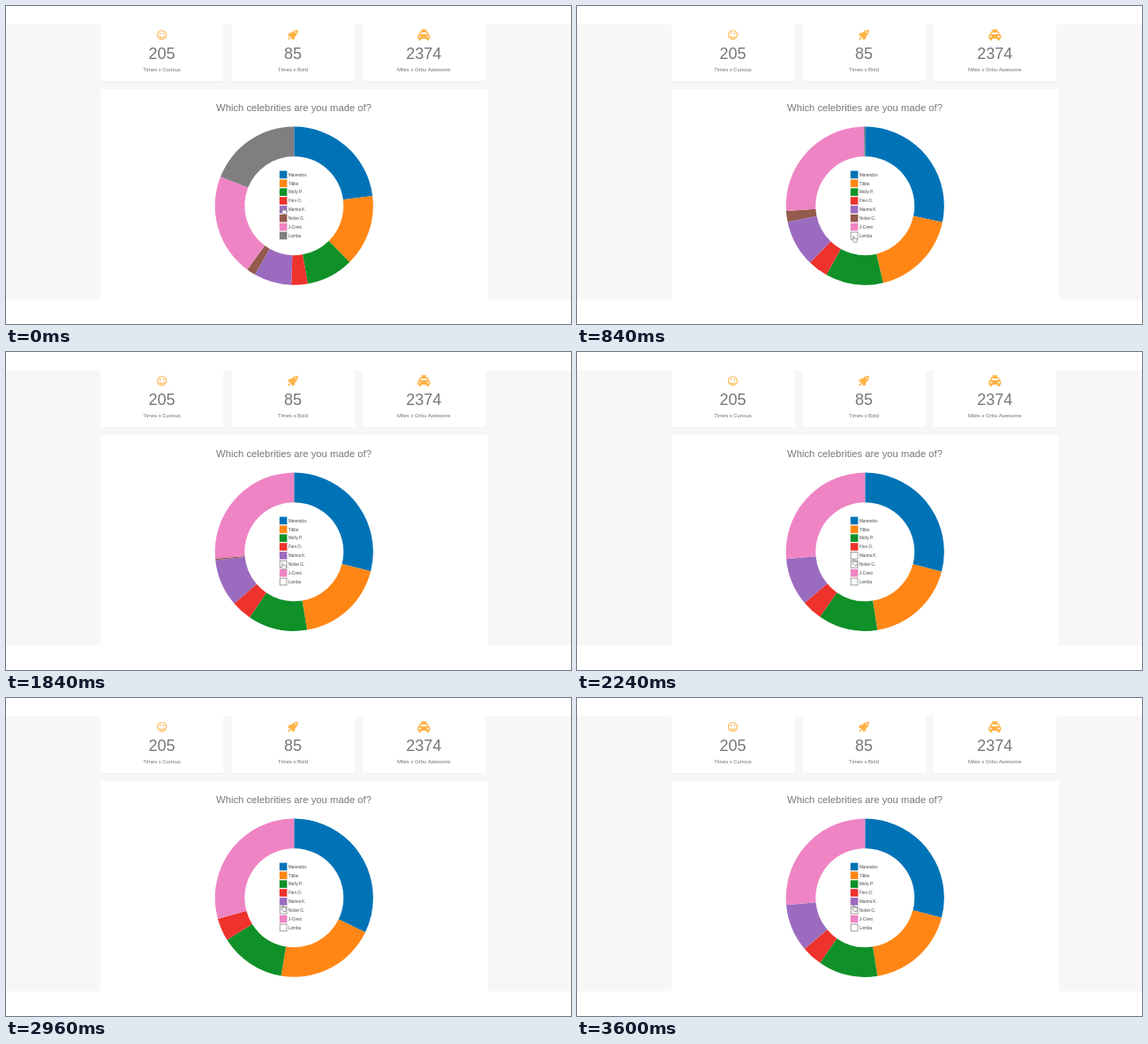
These frames come from a looping animation (640x360 px, 3640 ms). An HTML page with a canvas:

```html
<!DOCTYPE html>
<html lang="en">
<head>
<meta charset="utf-8">
<title>Celebrity donut</title>
<style>
  html, body { margin: 0; width: 100%; height: 100%; overflow: hidden; background: #fff; }
  canvas { display: block; width: 640px; height: 360px; }
</style>
</head>
<body>
<canvas id="stage" width="640" height="360"></canvas>
<script>
const ctx = document.getElementById('stage').getContext('2d');
const LOOP = 3640, STEP = 40;
const FONT = '"Liberation Sans", Arial, sans-serif';
const AMBER = '#ffb347';

const series = [
  { name: 'Marendos', color: '#0073b7', size: 82.8 },
  { name: 'Tibbo', color: '#ff8614', size: 52.6 },
  { name: 'Molly P.', color: '#0f9028', size: 34.6 },
  { name: 'Finn O.', color: '#ee322c', size: 12 },
  { name: 'Marina K.', color: '#9b6bbf', size: 27.7 },
  { name: 'Nolan G.', color: '#935a4d', size: 6.6 },
  { name: 'J-Crest', color: '#ee84c4', size: 75.3 },
  { name: 'Lomba', color: '#7f7f7f', size: 68.4 }
];

// Each click toggles one legend entry; the ring follows shortly after.
const clicks = [
  { at: 550, index: 7 },
  { at: 1600, index: 5 },
  { at: 2195, index: 4 },
  { at: 2940, index: 4 }
];
const RING_DELAY = 35, RING_TIME = 300;

const pointerPath = [
  [0, 314, 228.5], [480, 313.5, 260.5], [1120, 313.5, 260.5],
  [1560, 313.5, 239], [1880, 313.5, 239], [2160, 313.7, 234.5], [LOOP, 313.7, 234.5]
];

const clamp = v => Math.max(0, Math.min(1, v));
const lerp = (a, b, k) => a + (b - a) * k;
const cubic = k => k < .5 ? 4 * k ** 3 : 1 - 4 * (1 - k) ** 3;

function visibleAt(t) {
  const shown = series.map(() => true);
  for (const c of clicks) if (t >= c.at) shown[c.index] = !shown[c.index];
  return shown;
}

function edges(shown) {
  const sizes = series.map((s, i) => shown[i] ? s.size : 0);
  const total = sizes.reduce((a, b) => a + b);
  let sum = 0;
  return [0, ...sizes.map(v => (sum += v) / total * Math.PI * 2)];
}

function ringEdges(t) {
  let current = edges(visibleAt(0));
  for (const c of clicks) {
    const k = cubic(clamp((t - c.at - RING_DELAY) / RING_TIME));
    const next = edges(visibleAt(c.at));
    current = current.map((a, i) => lerp(a, next[i], k));
  }
  return current;
}

function rect(x, y, w, h, color) {
  ctx.fillStyle = color;
  ctx.fillRect(x, y, w, h);
}

function text(str, x, y, size, color, align = 'center') {
  ctx.font = `${size}px ${FONT}`;
  ctx.textAlign = align;
  ctx.fillStyle = color;
  ctx.fillText(str, x, y);
}

function shape(d, color) {
  ctx.fillStyle = color;
  ctx.fill(new Path2D(d));
}

function dot(x, y, r, color) {
  ctx.beginPath();
  ctx.arc(x, y, r, 0, Math.PI * 2);
  ctx.fillStyle = color;
  ctx.fill();
}

function at(x, y, draw) {
  ctx.save();
  ctx.translate(x, y);
  draw();
  ctx.restore();
}

function smile() {
  ctx.strokeStyle = AMBER;
  ctx.lineWidth = 1.1;
  ctx.beginPath();
  ctx.arc(0, 0, 5, 0, Math.PI * 2);
  ctx.stroke();
  ctx.beginPath();
  ctx.arc(0, .4, 2.8, .3, Math.PI - .3);
  ctx.stroke();
  dot(-1.8, -1.6, .9, AMBER);
  dot(1.8, -1.6, .9, AMBER);
}

function rocket() {
  shape('M5.8-5.8Q1-6-1.8-2.4L-4.4-2.2-6 1-3.2 1.2-3.6 2.2-2.2 3.6-1.2 3.2-1 6 2.2 4.4 2.4 1.8Q6-1 5.8-5.8Z', AMBER);
  shape('M-4 2.6Q-5.6 3.4-5.4 5.4-3.4 5.6-2.6 4Z', AMBER);
  dot(3.2, -3.2, .9, '#fff');
}

function taxi() {
  shape('M-2.6-6.5H2.6V-4.2H3.4Q4.3-4.2 4.7-3L5.6-.6Q7-.4 7 1V4.2H5.8V5.2Q5.6 6.4 4.4 6.4 3.2 6.4 3 5.2V4.2H-3V5.2Q-3.2 6.4-4.4 6.4-5.6 6.4-5.8 5.2V4.2H-7V1Q-7-.4-5.6-.6L-4.7-3Q-4.3-4.2-3.4-4.2H-2.6Z', AMBER);
  shape('M-3.2-2.8H3.2L4-.6H-4Z', '#fff');
  dot(-4.6, 1.8, 1.1, '#fff');
  dot(4.6, 1.8, 1.1, '#fff');
}

function card(x, y, w, h) {
  rect(x, y, w, h + .6, '#f0f0f0');
  rect(x, y, w, h, '#fff');
}

function stat(x, icon, value, label) {
  card(x - 69.5, 21, 139.5, 64);
  at(x, 32.7, icon);
  text(value, x, 60.3, 18, '#777');
  text(label, x, 73.8, 5.9, '#707070');
}

function drawPage() {
  rect(0, 0, 640, 360, '#fff');
  rect(0, 21, 640, 311, '#f7f7f7');
  stat(176.5, smile, '205', 'Times x Curious');
  stat(325, rocket, '85', 'Times x Bold');
  stat(473.3, taxi, '2374', 'Miles x Orbu Awesome');
  rect(107, 94, 439, 238, '#fff');
  text('Which celebrities are you made of?', 326, 119.4, 11.27, '#777');
}

function drawRing(t) {
  const angles = ringEdges(t);
  series.forEach((s, i) => {
    const from = angles[i] - Math.PI / 2, to = angles[i + 1] - Math.PI / 2;
    if (to - from < 1e-4) return;
    ctx.beginPath();
    ctx.arc(326.3, 226.2, 89.6, from, to);
    ctx.arc(326.3, 226.2, 56, to, from, true);
    ctx.fillStyle = s.color;
    ctx.fill();
  });
}

function drawLegend(t) {
  const shown = visibleAt(t);
  series.forEach((s, i) => {
    const y = 190.9 + i * 9.87;
    if (shown[i]) {
      rect(309.8, y - 4.3, 8.6, 8.6, s.color);
    } else {
      ctx.strokeStyle = '#858585';
      ctx.lineWidth = .8;
      ctx.strokeRect(310.2, y - 3.9, 7.8, 7.8);
    }
    text(s.name, 320, y + 1.8, 4.6, '#444', 'left');
  });
}

function drawPointer(t) {
  const i = pointerPath.findIndex(p => p[0] > t);
  const a = pointerPath[i - 1], b = pointerPath[i];
  const k = cubic((t - a[0]) / (b[0] - a[0]));
  at(lerp(a[1], b[1], k), lerp(a[2], b[2], k), () => {
    const hand = 'M-.6.4Q0-.6.6.4V2.6L3.2 3Q4.2 3.2 4 4.4L3.4 7H.2L-2 4.2Q-1.8 3.2-.6 4Z';
    shape(hand, '#fff');
    ctx.strokeStyle = '#666';
    ctx.lineWidth = .6;
    ctx.stroke(new Path2D(hand));
  });
}

function frame(now) {
  const t = Math.floor((now % LOOP) / STEP) * STEP;
  drawPage();
  drawRing(t);
  drawLegend(t);
  drawPointer(t);
  requestAnimationFrame(frame);
}

frame(0);
</script>
</body>
</html>
```
